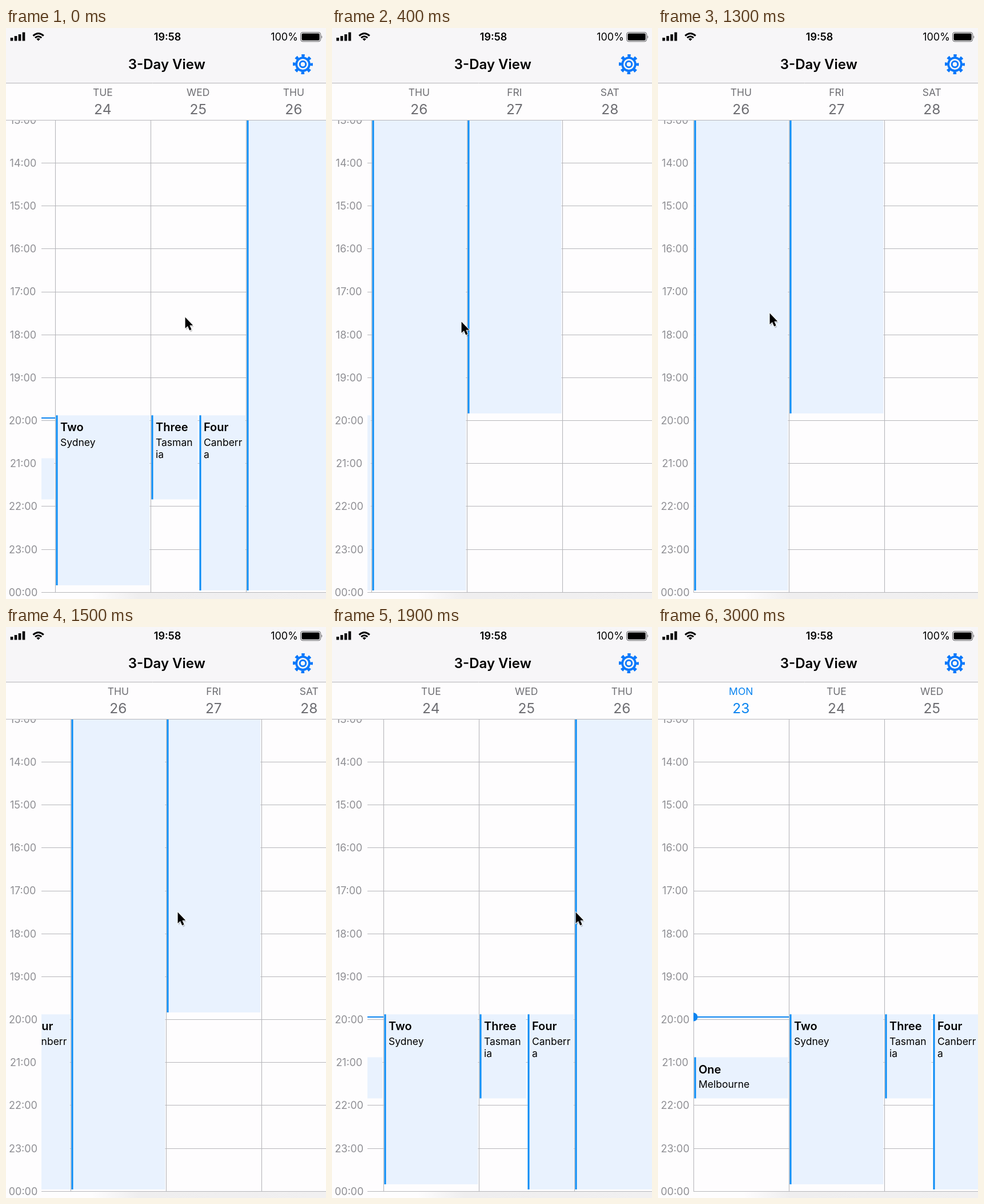
Recreate the animation shown at these times as an HTML page. Size 560x1000 px, loop 3100 ms.

```html
<!DOCTYPE html>
<html lang="en">
<head>
<meta charset="utf-8">
<title>3-Day View</title>
<style>
  html, body { margin: 0; width: 100%; height: 100%; overflow: hidden; background: #fefdfe; }
  svg { display: block; font-family: Inter, "Noto Sans", sans-serif; }
  .mid { text-anchor: middle; }
  .hour { fill: #8e8e93; font-size: 18px; }
  .grid { stroke: #b6b6ba; stroke-width: 1.1; }
  .day { fill: #6d6d72; font-size: 17.5px; }
  .date { fill: #6d6d72; font-size: 24.5px; }
  .today { fill: #0a84f0; }
  .name { font-size: 20px; font-weight: 600; }
  .place { font-size: 17.5px; }
  .status { font-size: 18px; }
  .bold { font-weight: 600; }

  #days { animation: scroll 3100ms step-end infinite; }
  #pointer { animation: point 3100ms step-end infinite; }

  /* flick forward to Thursday, then back to Monday, in 100 ms steps */
  @keyframes scroll {
    0% { transform: translateX(-143px); }
    3.22% { transform: translateX(-291px); }
    6.45% { transform: translateX(-411px); }
    9.67% { transform: translateX(-473px); }
    12.9% { transform: translateX(-494px); }
    16.12% { transform: translateX(-499.5px); }
    19.35% { transform: translateX(-501px); }
    45.16% { transform: translateX(-491px); }
    48.38% { transform: translateX(-450px); }
    51.61% { transform: translateX(-390px); }
    54.83% { transform: translateX(-317.5px); }
    58.06% { transform: translateX(-224px); }
    61.29% { transform: translateX(-139px); }
    64.51% { transform: translateX(-76px); }
    67.74% { transform: translateX(-35px); }
    70.96% { transform: translateX(-13px); }
    74.19% { transform: translateX(-3px); }
    77.41%, 100% { transform: translateX(0); }
  }
  @keyframes point {
    0% { transform: translate(313px, 506px); }
    3.22% { transform: translate(255px, 511px); }
    6.45% { transform: translate(230px, 514px); }
    9.67% { transform: translate(226px, 514px); }
    22.58% { transform: translate(215px, 509px); }
    25.8% { transform: translate(204px, 503px); }
    29.03% { transform: translate(195px, 499px); }
    45.16% { transform: translate(225px, 499px); }
    48.38% { transform: translate(300px, 499px); }
    51.61% { transform: translate(385px, 499px); }
    54.83% { transform: translate(426px, 499px); opacity: 1; }
    70.96%, 100% { transform: translate(426px, 499px); opacity: 0; }
  }
</style>
</head>
<body>
<svg width="560" height="1000" viewBox="0 0 560 1000">
  <defs>
    <linearGradient id="shade">
      <stop offset="0" stop-color="#efeeef" stop-opacity="0"/>
      <stop offset=".2" stop-color="#efeeef"/>
      <stop offset="1" stop-color="#f1f0f1"/>
    </linearGradient>
  </defs>
  <rect width="560" height="1000" fill="#fefdfe"/>
  <rect x="150" y="988" width="410" height="12" fill="url(#shade)"/>
  <g id="hours"></g>

  <rect y="97" width="560" height="64" fill="#fefdfe"/>
  <svg x="62" width="498" height="1000"><g id="days"></g></svg>
  <path class="grid" d="M0 161.5H560"/>

  <rect width="560" height="96" fill="#f7f6f8"/>
  <path d="M0 96.5H560" stroke="#b4b3b6"/>
  <text class="mid status bold" x="282.5" y="21.8">19:58</text>
  <text class="mid status" x="487" y="21.8">100%</text>
  <text class="mid bold" x="281.3" y="72" font-size="24">3-Day View</text>

  <path d="M10 17V22.5M17 14V22.5M24 11V22.5M31 7.5V22.5" stroke="#000" stroke-width="4.6"/>
  <g fill="none" stroke="#000" stroke-width="3">
    <path d="M47.5 13.6Q56.5 5.4 65.8 13.6M51 17.2Q56.5 12.2 62.2 17.2"/>
    <path d="M53.4 19.2Q56.5 16.6 59.8 19.2L56.6 22.6Z" fill="#000" stroke="none"/>
  </g>
  <rect x="515.6" y="7.6" width="35" height="16" rx="4" fill="none" stroke="#77777a" stroke-width="1.3"/>
  <rect x="517.5" y="9.5" width="31.2" height="12.2" rx="2"/>
  <path d="M552 13Q554.6 15.6 552 18.4Z" fill="#77777a"/>

  <g fill="none" stroke="#0a78fb" transform="translate(519.5 63.5)">
    <circle r="11.4" stroke-width="3.8"/>
    <circle r="15.1" stroke-width="4.8" stroke-dasharray="5.4 6.459" stroke-dashoffset="2.7"/>
    <circle r="5.3" stroke-width="3"/>
  </g>

  <g id="pointer">
    <path d="M1 1V21L5.6 16.8L8.8 24.4L12.4 22.8L9.2 15.4H15Z" transform="translate(1 2)" fill="#000" opacity=".18"/>
    <path d="M.6 .6V20L5 16L8.2 23.6L11.6 22.1L8.4 14.7H14.2Z" stroke="#fff" stroke-width="1.5" paint-order="stroke"/>
  </g>
</svg>
<script>
  const COL = 167, HOUR = 75.17, TOP = 161.4;
  const tag = (name, attrs, body = '') =>
    `<${name} ${Object.entries(attrs).map(([k, v]) => `${k}="${v}"`).join(' ')}>${body}</${name}>`;
  const text = (cls, x, y, body) => tag('text', { class: cls, x, y }, body);
  const line = (d) => tag('path', { class: 'grid', d });

  let hours = '';
  for (let i = 0; i < 12; i++) {
    const y = TOP + i * HOUR;
    const label = String((13 + i) % 24).padStart(2, '0') + ':00';
    hours += line(`M62 ${Math.floor(y) + .5}H560`) + text('mid hour', 30, y + 6.4, label);
  }
  document.getElementById('hours').innerHTML = hours;

  // left, right, top, bottom within a day's column, then title and place lines
  const event = (x, [left, right, top, bottom, name, ...place]) =>
    tag('rect', { x: x + left, y: top, width: right - left, height: bottom - top, fill: '#e9f2fe' }) +
    tag('rect', { x: x + left, y: top, width: 3, height: bottom - top, fill: '#0a8cf5' }) +
    (name ? text('name', x + left + 7.5, top + 28, name) : '') +
    place.map((p, i) => text('place', x + left + 7.5, top + 53.5 + i * 21.2, p)).join('');

  const week = [
    ['MON', [1.5, 165.5, 753.5, 825.5, 'One', 'Melbourne']],
    ['TUE', [1.5, 165.5, 678.3, 976, 'Two', 'Sydney']],
    ['WED', [1.5, 82.5, 678.3, 825.5, 'Three', 'Tasman', 'ia'],
            [85.5, 166, 678.3, 985, 'Four', 'Canberr', 'a']],
    ['THU', [1.5, 165.5, 162, 985]],
    ['FRI', [1.5, 165.5, 162, 675]],
    ['SAT']
  ];
  document.getElementById('days').innerHTML = week.map(([day, ...events], i) => {
    const x = i * COL, now = i ? '' : ' today';
    return line(`M${x + .5} 162V988`) +
      text('mid day' + now, x + 83.3, 119, day) +
      text('mid date' + now, x + 83.3, 150.7, 23 + i) +
      events.map(e => event(x, e)).join('');
  }).join('') +
    `<path d="M0 683H${COL}" stroke="#0a84f0" stroke-width="2"/><circle cx="0" cy="683" r="7.5" fill="#0a84f0"/>`;
</script>
</body>
</html>
```
